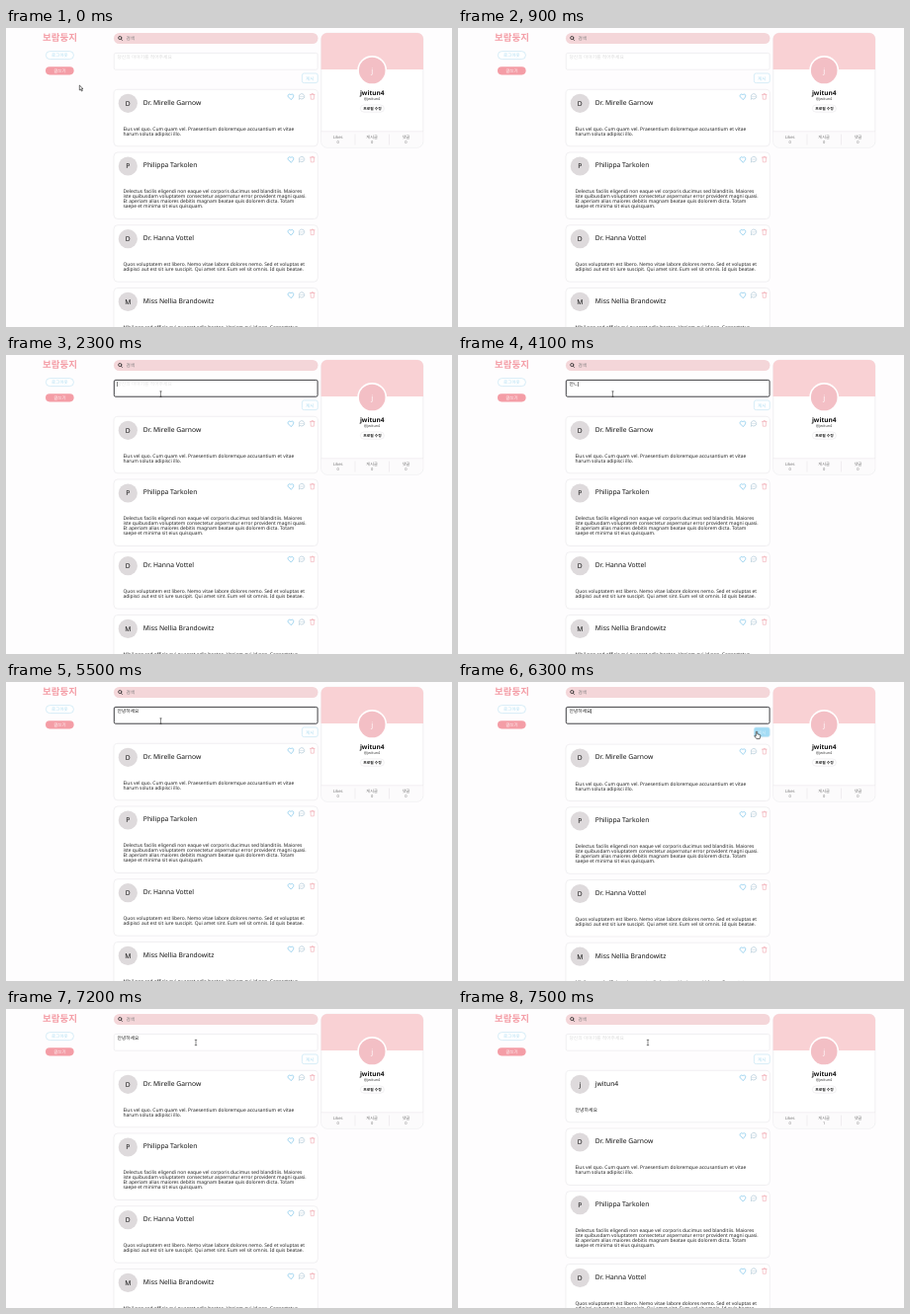
These frames come from a looping animation (451 by 303 pixels, 8 s). An HTML page:

```html
<!DOCTYPE html>
<html lang="ko">
<head>
<meta charset="utf-8">
<title>피드</title>
<style>
  html, body { margin: 0; width: 100%; height: 100%; overflow: hidden; background: #fefdfe; }
  svg { display: block; width: 100vw; height: 100vh; }
  text {
    font-family: "Noto Sans", "Noto Sans CJK KR", sans-serif;
    text-rendering: geometricPrecision;
    white-space: pre;
  }
  .mid { text-anchor: middle; }
  .line { fill: none; stroke-linecap: round; stroke-linejoin: round; }
</style>
</head>
<body>
<svg id="stage" viewBox="0 0 451 303"></svg>
<script>
const LOOP = 8000, STEP = 100;
const stage = document.getElementById('stage');
const BLUE = '#a9daf0', PALE_BLUE = '#c6e6f4', PINK = '#f49da6', EDGE = '#ebeaec', INK = '#111';

function add(parent, tag, attrs = {}, content = '') {
  const node = document.createElementNS('http://www.w3.org/2000/svg', tag);
  for (const key in attrs) node.setAttribute(key, attrs[key]);
  node.textContent = content;
  return parent.appendChild(node);
}
const box = (parent, x, y, width, height, rx, fill, stroke = 'none') =>
  add(parent, 'rect', { x, y, width, height, rx, fill, stroke, 'stroke-width': .7 });
const label = (parent, x, y, size, fill, content, extra = {}) =>
  add(parent, 'text', { x, y, 'font-size': size, fill, ...extra }, content);
const centered = (parent, x, y, size, fill, content, weight = 400) =>
  label(parent, x, y, size, fill, content, { class: 'mid', 'font-weight': weight });
const disc = (parent, cx, cy, r, fill) => add(parent, 'circle', { cx, cy, r, fill });
const line = (parent, d, stroke, width = .6) =>
  add(parent, 'path', { d, stroke, class: 'line', 'stroke-width': width });
const show = (node, on) => node.setAttribute('visibility', on ? 'visible' : 'hidden');
const move = (node, x, y) => node.setAttribute('transform', `translate(${x} ${y})`);

// Sidebar
label(stage, 37, 13.2, 9.5, PINK, '보람둥지', { 'font-weight': 900 });
box(stage, 40.4, 23.6, 28, 8, 4, '#fff', PALE_BLUE);
centered(stage, 54.4, 29.2, 4.5, BLUE, '로그아웃');
box(stage, 40, 39.2, 28.6, 8.2, 4.1, PINK);
centered(stage, 54.4, 45, 4.5, '#fff', '글쓰기');

// Search
box(stage, 109, 5, 206.5, 11, 5.5, '#f4d6d9');
line(stage, 'M116.5 11.4L117.5 12.4M116.9 10A1.6 1.6 0 1 1 113.7 10A1.6 1.6 0 1 1 116.9 10', '#222', .8);
label(stage, 121.6, 12, 4.6, '#777', '검색');

// Composer
const field = box(stage, 109.3, 25.4, 205.8, 16.8, 1.5, '#fff', EDGE);
const hint = label(stage, 112.4, 30.7, 4.8, '#dadada', '당신의 이야기를 적어주세요');
const typed = label(stage, 112.4, 30.7, 4.8, '#222', '');
const caret = add(stage, 'rect', { y: 27, width: .5, height: 5, fill: INK });
const button = box(stage, 299.4, 46, 15.8, 9.6, 2, '#fff', PALE_BLUE);
const buttonText = centered(stage, 307.3, 52.5, 4.6, BLUE, '게시');

// Feed
function card(parent, top, { name, lines }) {
  const g = add(parent, 'g');
  const height = 47.5 + 5 * lines.length;
  move(g, 0, top);
  box(g, 109, .3, 206.3, height, 4, '#fff', EDGE);
  disc(g, 123.3, 14.3, 9.6, '#dedadc');
  centered(g, 123.3, 16.7, 6.75, INK, name[0]);
  label(g, 138.8, 15.7, 6.75, INK, name);
  line(g, 'M288 10.4L285.4 7.8C284.2 6 286.6 3.9 288 5.8C289.4 3.9 291.8 6 290.6 7.8Z', '#80c6ea', .75);
  line(g, 'M296.5 10L296.6 8.5A2.7 2.7 0 1 1 297.7 9.7Z', '#a3bfd0');
  line(g, 'M297.8 7.4h.1M299 7.4h.1M300.2 7.4h.1', '#a3bfd0');
  line(g, 'M307.5 5.4H312.1M309 5.2V4.6H310.6V5.2M308 5.5L308.3 10.2H311.3L311.6 5.5', '#f0a8b0');
  lines.forEach((text, i) => label(g, 118.4, 41.8 + 5 * i, 4.9, '#222', text));
  return height + 6.2;
}
const TOP = 62;
const posts = [
  { name: 'Dr. Mirelle Garnow', lines: [
    'Eius vel quo. Cum quam vel. Praesentium doloremque accusantium et vitae',
    'harum soluta adipisci illo.'] },
  { name: 'Philippa Tarkolen', lines: [
    'Delectus facilis eligendi non eaque vel corporis ducimus sed blanditiis. Maiores',
    'iste quibusdam voluptatem consectetur aspernatur error provident magni quasi.',
    'Et aperiam alias maiores debitis magnam beatae quis dolorem dicta. Totam',
    'saepe et minima sit eius quisquam.'] },
  { name: 'Dr. Hanna Vottel', lines: [
    'Quos voluptatem est libero. Nemo vitae labore dolores nemo. Sed et voluptas et',
    'adipisci aut est sit iure suscipit. Qui amet sint. Eum vel sit omnis. Id quis beatae.'] },
  { name: 'Miss Nellia Brandowitz', lines: [
    'Nihil non sed officia qui quaerat odio beatae. Veniam qui id non. Consectetur',
    'quia dolor.'] },
];
const feed = add(stage, 'g');
posts.reduce((top, post) => top + card(feed, top, post), TOP);
const fresh = add(stage, 'g');
const freshHeight = card(fresh, TOP, { name: 'jwitun4', lines: ['안녕하세요'] });

// Profile
box(stage, 318.8, 5.2, 103, 116, 6, '#fff', EDGE);
add(stage, 'path', { d: 'M318.6 42V11a6 6 0 0 1 6-6H416a6 6 0 0 1 6 6V42Z', fill: '#f9d1d4' });
add(stage, 'path', { d: 'M319.2 105H421.4V115a6 6 0 0 1-6 5.8H325.2a6 6 0 0 1-6-5.8Z', fill: '#fcfbfc' });
disc(stage, 370.2, 43, 15, '#fff');
disc(stage, 370.2, 43, 13.3, '#f3bfc5');
centered(stage, 370.2, 45.6, 7.5, '#fff', 'j');
centered(stage, 370.2, 68.3, 6.5, INK, 'jwitun4', 700);
centered(stage, 370, 73.4, 3.8, '#444', '@jwitun4');
box(stage, 358.4, 78, 24, 7.2, 3.6, '#fff', EDGE);
centered(stage, 370.4, 83, 3.8, '#222', '프로필 수정', 700);
line(stage, 'M319 104.8H421.6M353 108V118M387.5 108V118', '#e7e5e7');
const counts = ['Likes', '게시글', '댓글'].map((name, i) => {
  const x = 335.7 + 34.4 * i;
  centered(stage, x, 112, 4.2, '#777', name);
  return centered(stage, x, 117.4, 4, '#777', '0');
});

// Pointer shapes, each with its hot spot at the origin
const pointer = add(stage, 'g');
const shapes = {
  arrow: add(pointer, 'path', { d: 'M0 0V5L1.2 4L2.1 6L3 5.6L2.1 3.7H3.7Z', fill: '#fff', stroke: INK, 'stroke-width': .6 }),
  beam: line(pointer, 'M-.8 -2.7H.8M0 -2.7V2.7M-.8 2.7H.8', '#333', .55),
  hand: add(pointer, 'path', {
    d: 'M-.7 .5Q0 -.5 .7 .5V2.8L3.2 3.4Q4 3.7 3.8 4.6L3.1 7.6H-.1L-2.3 4.7Q-2 3.8 -.7 4.8Z',
    fill: '#fff', stroke: INK, 'stroke-width': .6 }),
};

// [time, x, y]
const route = [
  [0, 74.3, 58], [300, 84, 312], [1000, 10, 212], [1900, 156.5, 39], [2000, 156.5, 39.6],
  [5800, 156.5, 39.6], [6300, 302, 50], [6500, 303.3, 53.2], [6600, 303.3, 53.2],
  [6700, 307, 48], [7200, 192, 34], [LOOP, 192, 34],
];
const keystrokes = [
  [3800, 'ㅇ'], [3900, '아'], [4100, '안ㄴ'], [4200, '안녀'], [4300, '안녕'], [4500, '안녕ㅎ'],
  [4600, '안녕하'], [4700, '안녕하ㅅ'], [4800, '안녕하세'], [4900, '안녕하세ㅇ'], [5000, '안녕하세요'],
  [7500, ''],
];
const within = (t, from, to) => t >= from && t < to;

function pointerAt(t) {
  const i = route.findIndex(stop => stop[0] > t);
  const [t0, x0, y0] = route[i - 1], [t1, x1, y1] = route[i];
  const p = (t - t0) / (t1 - t0), ease = p * p * (3 - 2 * p);
  return [x0 + (x1 - x0) * ease, y0 + (y1 - y0) * ease];
}

function render(t) {
  const focused = within(t, 2300, 6400);
  const hover = within(t, 6300, 6700);
  const posted = t >= 7500;
  const value = keystrokes.reduce((last, [at, text]) => t >= at ? text : last, '');

  field.setAttribute('stroke', focused ? '#2a2a2e' : EDGE);
  field.setAttribute('stroke-width', focused ? .9 : .7);
  typed.textContent = value;
  show(hint, !value);
  hint.setAttribute('fill', focused ? '#e6e6e6' : '#dadada');

  const blinkStart = t < 3800 ? 2300 : 5000;
  const lit = within(t, 3800, 5000) || (t - blinkStart) % 1000 < 500;
  caret.setAttribute('x', 112.3 + 4.42 * value.length);
  show(caret, focused && lit);

  button.setAttribute('fill', hover ? '#a3dcf5' : '#fff');
  buttonText.setAttribute('fill', hover ? '#d9f1fb' : BLUE);
  move(feed, 0, posted ? freshHeight : hover ? .8 : 0);
  show(fresh, posted);
  counts[1].textContent = posted ? '1' : '0';

  const [x, y] = pointerAt(t);
  const inField = x > 109 && x < 315 && y > 25 && y < 43;
  const kind = hover ? 'hand' : inField ? 'beam' : 'arrow';
  move(pointer, x, y);
  for (const name in shapes) show(shapes[name], name === kind && !within(t, 300, 1100));
}

function tick(now) {
  render(Math.floor((now % LOOP) / STEP) * STEP);
  requestAnimationFrame(tick);
}
render(0);
requestAnimationFrame(tick);
</script>
</body>
</html>
```
